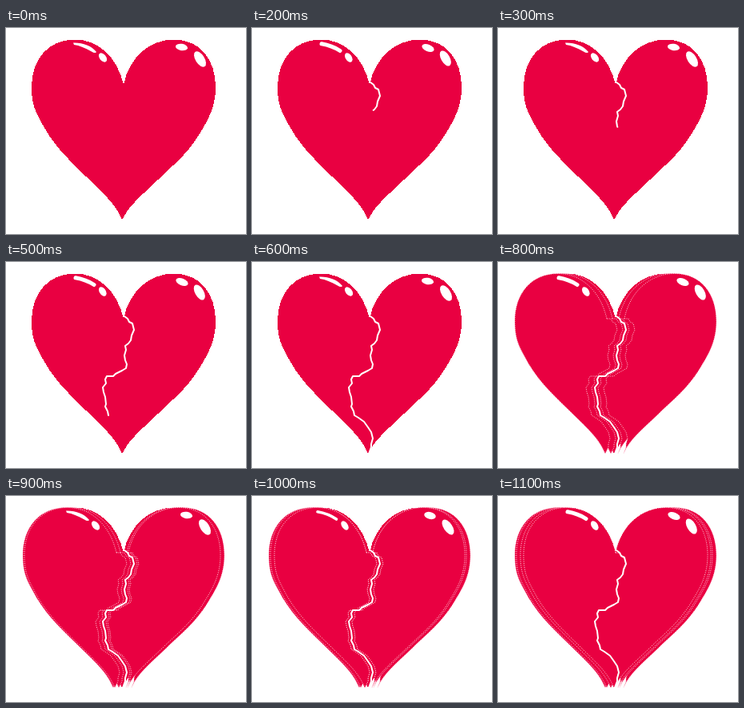
Animation of 300x258 px, one loop 1.2 s. Source, as an HTML page without scripts:

```html
<!DOCTYPE html>
<html lang="en">
<head>
<meta charset="utf-8">
<title>Breaking heart</title>
<style>
html, body { margin: 0; width: 100%; height: 100%; overflow: hidden; background: #fff; }
svg { display: block; width: 100vw; height: 100vh; }

.heart { fill: #e90041; shape-rendering: crispEdges; }
.half { fill: #e90041; stroke: #ffd3de; stroke-width: 1; stroke-dasharray: 1 1.5; }
.shine { fill: #fff; }
.line { fill: none; stroke: #fff; stroke-linecap: round; }
.crack {
  fill: none; stroke: #fff; stroke-width: 2;
  stroke-linecap: round; stroke-linejoin: round;
  stroke-dasharray: 100 120;
  animation: crack 1.2s step-end infinite;
}
@keyframes crack {
  0% { stroke-dashoffset: 105; }
  8.33% { stroke-dashoffset: 91; }
  16.66% { stroke-dashoffset: 80; }
  25% { stroke-dashoffset: 69.3; }
  33.33% { stroke-dashoffset: 50; }
  41.66% { stroke-dashoffset: 27.4; }
  50%, 100% { stroke-dashoffset: 0; }
}

/* each pair of halves stays once it has been laid down */
.pair { animation: 1.2s step-end infinite; }
.p1 { animation-name: p1; }
.p2 { animation-name: p2; }
.p3 { animation-name: p3; }
.p4 { animation-name: p4; }
.p5 { animation-name: p5; }
@keyframes p1 { 0% { opacity: 0; } 58.33%, 100% { opacity: 1; } }
@keyframes p2 { 0% { opacity: 0; } 66.66%, 100% { opacity: 1; } }
@keyframes p3 { 0% { opacity: 0; } 75%, 100% { opacity: 1; } }
@keyframes p4 { 0% { opacity: 0; } 83.33%, 100% { opacity: 1; } }
@keyframes p5 { 0% { opacity: 0; } 91.66%, 100% { opacity: 1; } }

/* highlights ride on the newest halves */
.left { animation: left 1.2s step-end infinite; }
.right { animation: right 1.2s step-end infinite; }
@keyframes left {
  0% { transform: translateX(0); }
  58.33% { transform: translateX(-4px); }
  66.66% { transform: translateX(-11px); }
  75% { transform: translateX(-9px); }
  83.33% { transform: translateX(-4px); }
  91.66%, 100% { transform: translateX(0); }
}
@keyframes right {
  0% { transform: translateX(0); }
  58.33% { transform: translateX(4px); }
  66.66% { transform: translateX(11px); }
  75% { transform: translateX(6px); }
  83.33% { transform: translateX(4px); }
  91.66%, 100% { transform: translateX(0); }
}

/* three hand-drawn looks take turns */
.a, .b, .c { animation: .3s step-end infinite; }
.a { animation-name: a; }
.b { animation-name: b; }
.c { animation-name: c; }
@keyframes a { 0% { opacity: 1; } 33.33%, 100% { opacity: 0; } }
@keyframes b { 0% { opacity: 0; } 33.33% { opacity: 1; } 66.66%, 100% { opacity: 0; } }
@keyframes c { 0% { opacity: 0; } 66.66%, 100% { opacity: 1; } }
</style>
</head>
<body>
<svg viewBox="0 0 300 258">
  <defs>
    <path id="l" d="M147 71 152 71 154 75 158 77 160 85 157 92 156 98 153 102 149 105 150 110 148 117 149 123 151 128 150 133 145 136 137 140 134 143 126 143 124 147 125 152 121 157 122 163 124 169 125 178 124 181 127 187 128 192 133 195 140 200 145 207 149 213 151 221 149 228 149 232 145 240C136 219 122 208 100 186C76 163 57 144 44 118C37 105 32 96 32 74C32 40 52 14.5 86 14.5C115 14.5 139 36 147 71Z"/>
    <path id="r" d="M147 71 152 71 154 75 158 77 160 85 157 92 156 98 153 102 149 105 150 110 148 117 149 123 151 128 150 133 145 136 137 140 134 143 126 143 124 147 125 152 121 157 122 163 124 169 125 178 124 181 127 187 128 192 133 195 140 200 145 207 149 213 151 221 149 228 149 232 146 240C153 223 168 211 190 190C207 173 225 160 241 134C252 116 262 100 262 74C262 40 243 14.5 210 14.5C180 14.5 154 36 147 71Z"/>
  </defs>

  <path class="heart" d="M147 71C139 36 115 14.5 86 14.5C52 14.5 32 40 32 74C32 96 37 105 44 118C57 144 76 163 100 186C122 208 136 219 145 240C153 223 168 211 190 190C207 173 225 160 241 134C252 116 262 100 262 74C262 40 243 14.5 210 14.5C180 14.5 154 36 147 71Z"/>

  <g class="half">
    <g class="pair p1"><use href="#l" x="-4"/><use href="#r" x="4"/></g>
    <g class="pair p2"><use href="#l" x="-11"/><use href="#r" x="11"/></g>
    <g class="pair p3"><use href="#l" x="-9"/><use href="#r" x="6"/></g>
    <g class="pair p4"><use href="#l" x="-4"/><use href="#r" x="4"/></g>
    <g class="pair p5"><use href="#l"/><use href="#r"/></g>
  </g>

  <path class="crack" pathLength="100" d="M148 68 152 71 154 75 158 77 160 85 157 92 156 98 153 102 149 105 150 110 148 117 149 123 151 128 150 133 145 136 137 140 134 143 126 143 124 147 125 152 121 157 122 163 124 169 125 178 124 181 127 187 128 192 133 195 140 200 145 207 149 213 151 221 149 228 149 232 146 240"/>

  <g class="shine left">
    <g class="a">
      <path d="M84 18.5C95 18 107 22 113 30C112 32 109 31 106 29C99 25 92 22 85 21Z"/>
      <ellipse rx="4" ry="6.5" transform="translate(121 37) rotate(-38)"/>
    </g>
    <g class="b">
      <path class="line" stroke-width="3.6" d="M86 19.8Q99 22 109.500 29"/>
      <ellipse rx="3.8" ry="6.3" transform="translate(120 37) rotate(-34)"/>
    </g>
    <g class="c">
      <path class="line" stroke-width="5" d="M87 19.8Q100 22 110 28.500"/>
      <ellipse rx="4" ry="6.4" transform="translate(120.800 37) rotate(-32)"/>
    </g>
  </g>

  <g class="shine right">
    <g class="a">
      <ellipse rx="7.6" ry="4.2" transform="translate(219.500 24) rotate(10)"/>
      <ellipse rx="5.6" ry="11" transform="translate(242.500 39) rotate(-32)"/>
    </g>
    <g class="b">
      <ellipse rx="7.4" ry="4.4" transform="translate(218.500 24.500) rotate(14)"/>
      <ellipse rx="5.4" ry="10.8" transform="translate(241 39) rotate(-34)"/>
    </g>
    <g class="c">
      <ellipse rx="8" ry="4.4" transform="translate(220 25) rotate(22)"/>
      <ellipse rx="5.4" ry="10.6" transform="translate(241.800 38) rotate(-30)"/>
    </g>
  </g>
</svg>
</body>
</html>
```
